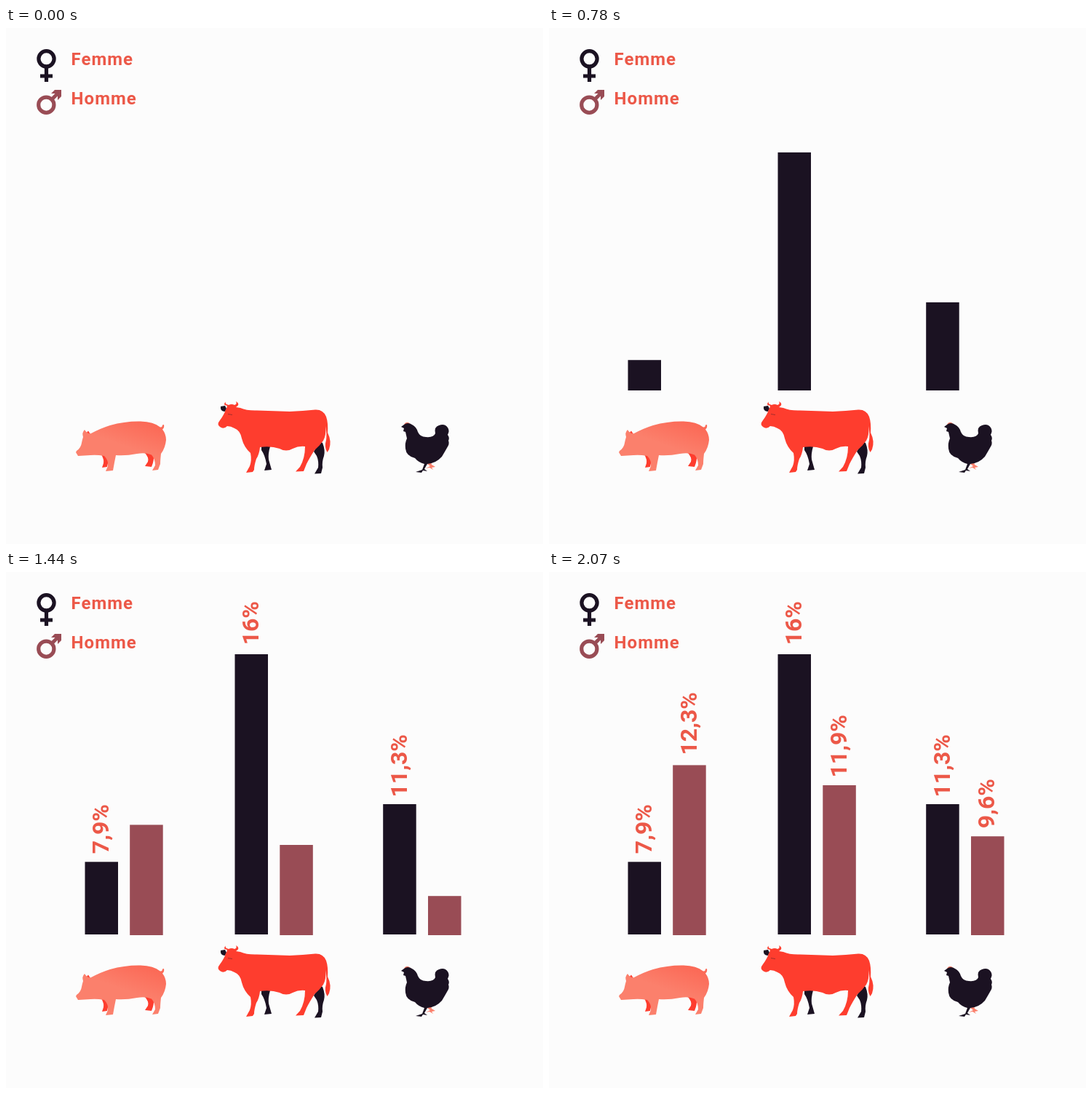
An HTML page that plays this animation: 738x709 px, repeating every 3.6 s.

```html
<!DOCTYPE html>
<html lang="fr">
<head>
<meta charset="utf-8">
<title>Femme / Homme</title>
<style>
  html, body { margin: 0; width: 100%; height: 100%; overflow: hidden; background: #fcfcfc; }
  svg { display: block; width: 738px; height: 709px; }
  text { font-family: Roboto, sans-serif; font-weight: 700; fill: #ec5848; }
  .legend { font-size: 24px; letter-spacing: 1px; }
  .value { font-size: 32px; text-anchor: end; }
  .dark { fill: #1b1222; }
  .plum { fill: #994c55; }
  .red { fill: #fe3d2e; }
  .pink { fill: #fb806c; }
  .ring { fill: none; stroke-width: 5.2; }
</style>
</head>
<body>
<svg viewBox="0 0 738 709">
  <defs>
    <linearGradient id="hide" gradientUnits="userSpaceOnUse" x1="188" y1="541" x2="171" y2="588">
      <stop offset="0" stop-color="#fb6a57"/>
      <stop offset=".8" stop-color="#fb806c"/>
    </linearGradient>
  </defs>

  <g class="ring" stroke="#1b1222">
    <circle cx="55.5" cy="42.3" r="10.6"/>
    <path d="M55.5 54V74M47 66H64"/>
  </g>
  <circle class="ring" stroke="#994c55" cx="55.3" cy="105.7" r="10.6"/>
  <path class="plum" d="M62 90L67 85H76V94L71 99V93.5L65 99.5L61.5 96L67.5 90Z"/>
  <text class="legend" x="89.6" y="50.6">Femme</text>
  <text class="legend" x="89.6" y="104.6">Homme</text>

  <g id="chart"></g>

  <g id="pig">
    <path class="red" d="M131 586Q135 593 134 598L132 604L139 603L142 588ZM190 583Q197 590 195 596L191 602L200 603Q204 594 203 584ZM110 557L113 553.5L116 558Z"/>
    <path fill="url(#hide)" d="M96 583L97 581Q103 577 104 570Q105 565 106 562Q104 556 108 552Q111 557 116 557.500Q130 550 143 546Q164 540 185 540.500Q203 541 212 548.500Q215 549 215 545.500L217 545Q218 549 215 551.500Q220 558 220 566Q219 577 213 585Q212 594 212 599L209 607L201 608L205 601Q205 592 200 586.500Q192 583 180 585Q165 588 151 587L149 597L147 608L137 609L140 602Q141 594 135 588Q124 586 116 587L99 588Z"/>
  </g>

  <g id="cow">
    <path class="dark" d="M301 527Q294 527 295 520L301 519L303 523ZM351 575L363 575Q360 585 361 593L365 607L355 608L358 599Q356 587 351 580ZM431 568L435 570Q439 580 437 588Q434 596 435 604L433 612L424 612.500L429 604Q430 595 427 588L423 582Z"/>
    <path class="red" d="M302 524Q305 520 303 518.500Q298 519 301.500 513.500Q301 517 306 518Q310 516 314 518Q318 517 316 513Q321 516 318.500 519L316 521L322 522Q331 526 345 525.500Q368 526 390 527Q408 526 425 524.500Q436 524 440 534Q443 543 442 556Q448 568 444 579L441.500 583Q437 576 440 566Q441 560 439.500 547Q440 560 436 567Q431 574 424 580Q417 591 413 599L409 609L398 609.500L404 603Q411 591 411 575Q402 574 394 578Q385 583 376 578Q364 574 349 576Q348 586 344 592Q341 601 341 607L339 610L330 611L335 602Q338 594 336 584Q327 576 324 564Q322 553 314 550Q309 547 304 547Q299 552 294 548Q289 545 294 539Q300 531 302 524Z"/>
    <path d="M305 530.500l6 1" stroke="#a52d2b"/>
  </g>

  <g id="hen">
    <path class="pink" d="M547 545Q549 541 553 542L557 545ZM579 599L584 597L585 600L590 603L585 604L587 607L582 604L577 605L583 602Z"/>
    <path class="dark" d="M543 548L547 545Q552 541 558 545Q564 548 566 555Q569 562 577 562Q588 563 590 557Q588 548 595 546Q603 543 607 549Q610 553 607 559Q610 563 608 567Q610 571 606 577Q602 584 599 589Q591 598 579 599L575 606L579 609L573 608L571 611L563 610L572 607L575 599Q567 597 562 591Q550 588 549 578Q548 570 551 564L549 555L546 554L547 550Z"/>
  </g>
</svg>

<script>
const LOOP = 3600, STEP = 30;

const groups = [
  { className: "dark", base: 498, travel: 385,
    barStart: 80, barTime: 824, textStart: 904, textTime: 338,
    bars: [
      { x: 108.5, top: 398.3, label: "7,9%", labelTop: 319, slide: 108 },
      { x: 314.5, top: 113, label: "16%", labelTop: 40, slide: 108 },
      { x: 518.2, top: 319, label: "11,3%", labelTop: 223, slide: 131 }
    ] },
  { className: "plum", base: 499, travel: 234,
    barStart: 908, barTime: 819, textStart: 1727, textTime: 335,
    bars: [
      { x: 170.2, top: 265.4, label: "12,3%", labelTop: 165, slide: 108 },
      { x: 376.3, top: 293, label: "11,9%", labelTop: 196, slide: 108 },
      { x: 580, top: 363.2, label: "9,6%", labelTop: 284, slide: 91 }
    ] }
];

const chart = document.getElementById("chart");

function add(tag, className) {
  const node = document.createElementNS("http://www.w3.org/2000/svg", tag);
  node.setAttribute("class", className);
  return chart.appendChild(node);
}

for (const group of groups) {
  for (const bar of group.bars) {
    bar.text = add("text", "value");
    bar.text.textContent = bar.label;
    bar.rect = add("rect", group.className);
    bar.rect.setAttribute("x", bar.x);
    bar.rect.setAttribute("width", 45.5);
  }
}

// Share of a linear move still to go, from 1 down to 0
const remaining = (t, start, time) => 1 - Math.min(1, Math.max(0, (t - start) / time));

function draw(t) {
  for (const g of groups) {
    const drop = g.travel * remaining(t, g.barStart, g.barTime);
    const textLeft = remaining(t, g.textStart, g.textTime);
    for (const bar of g.bars) {
      const y = bar.top + drop;
      bar.rect.setAttribute("y", y);
      bar.rect.setAttribute("height", Math.max(0, g.base - y));
      const labelY = bar.labelTop + bar.slide * textLeft;
      bar.text.setAttribute("transform", `translate(${bar.x + 32.3} ${labelY}) rotate(-90)`);
      bar.text.setAttribute("visibility", textLeft < 1 ? "visible" : "hidden");
    }
  }
}

const begin = performance.now();
function tick() {
  const t = (performance.now() - begin) % LOOP;
  draw(Math.floor(t / STEP) * STEP);
  requestAnimationFrame(tick);
}
tick();
</script>
</body>
</html>
```
